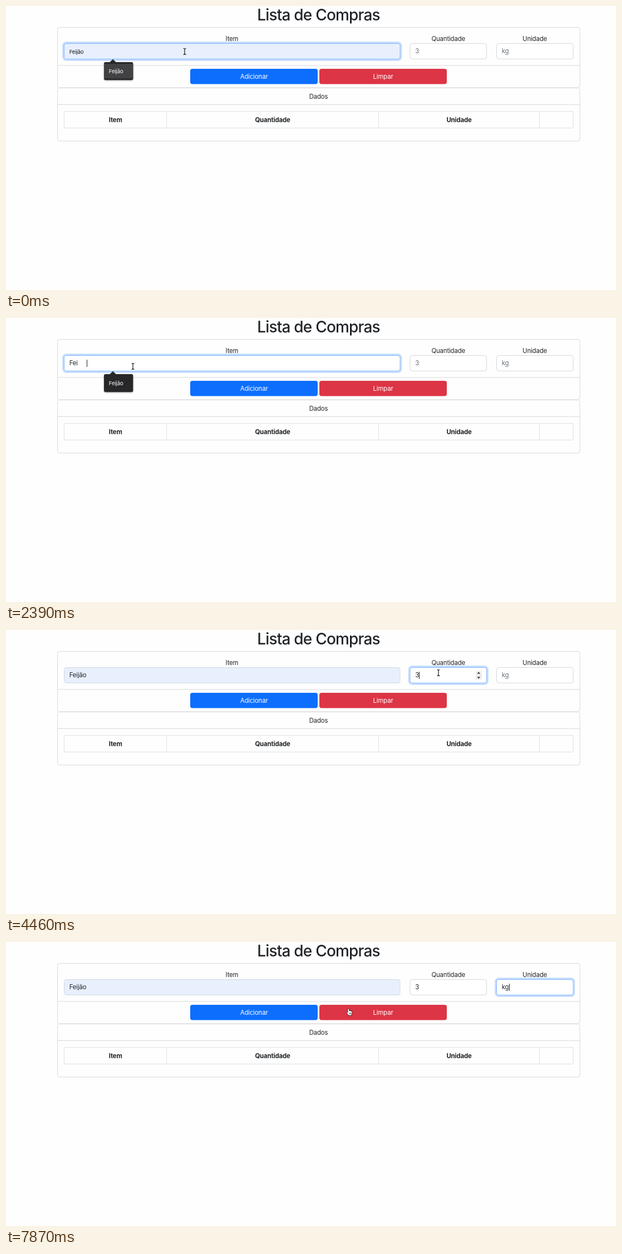
Animation, 1096 px wide and 511 px high, one loop 8 s. Source, as an HTML page with a canvas:

```html
<!DOCTYPE html>
<html lang="pt-BR">
<head>
<meta charset="utf-8">
<title>Lista de Compras</title>
<style>
  html, body { margin: 0; width: 100%; height: 100%; overflow: hidden; background: #fefefe; }
  canvas { display: block; }
</style>
</head>
<body>
<canvas id="stage" width="1096" height="511"></canvas>
<script>
const ctx = document.getElementById('stage').getContext('2d');
const LOOP = 8000;
const INK = '#212529', HINT = '#6c7278', LINE = '#d8d9da', FOCUS = '#86b7fe';

const fields = {
  item: { x: 104.5, w: 603.5, textX: 113.7 },
  qty: { x: 726, w: 137.5, textX: 735.2 },
  unit: { x: 881.5, w: 137.5, textX: 890.7 }
};

const start = {
  focus: 'item', item: 'Feijão', qty: '', unit: '', preview: true, filled: false,
  tip: 'item', caret: false, spin: false, cursor: 'beam', x: 321, y: 82
};

// Each entry changes part of the state from its time on.
const steps = [
  [1050, { cursor: 'none' }],
  [1340, { cursor: 'arrow', x: 704, y: 43 }],
  [1490, { cursor: 'beam', x: 767, y: 80, spin: true }],
  [1640, { x: 765, y: 83, focus: 'qty', item: 'Fei', preview: false, tip: '', caret: true }],
  [1940, { x: 690, y: 83 }],
  [2090, { x: 450, y: 84 }],
  [2240, { x: 290, y: 86 }],
  [2390, { x: 228, y: 87, focus: 'item', spin: false, tip: 'item' }],
  [2540, { cursor: 'arrow', x: 216, y: 108, preview: true, item: 'Feijão', caret: false }],
  [2680, { x: 215, y: 116 }],
  [2980, { preview: false, filled: true, tip: '', caret: true }],
  [3130, { x: 390, y: 108 }],
  [3280, { cursor: 'beam', x: 640, y: 88 }],
  [3430, { x: 765, y: 82, spin: true }],
  [3580, { focus: 'qty' }],
  [4020, { qty: '3' }],
  [4160, { x: 779, y: 77 }],
  [4460, { x: 777 }],
  [4610, { x: 826, y: 79 }],
  [4760, { x: 889, y: 82, spin: false }],
  [4900, { x: 925, y: 84 }],
  [5050, { x: 932, y: 85, focus: 'unit' }],
  [5200, { tip: 'unit' }],
  [5650, { caret: false }],
  [6090, { caret: true }],
  [6690, { caret: false }],
  [7140, { caret: true }],
  [7280, { unit: 'k' }],
  [7580, { unit: 'kg', tip: '' }],
  [7870, { cursor: 'hand', x: 617, y: 126 }]
];

function stateAt(t) {
  return Object.assign({}, start, ...steps.filter(s => s[0] <= t).map(s => s[1]));
}

function text(str, x, y, { size = 11.4, weight = 400, color = INK, align = 'left', gap = -0.15 } = {}) {
  ctx.font = `${weight} ${size}px Inter, Roboto, sans-serif`;
  ctx.letterSpacing = gap + 'px';
  ctx.textAlign = align;
  ctx.fillStyle = color;
  ctx.fillText(str, x, y);
}

function box(x, y, w, h, r, fill, stroke, width = 1) {
  ctx.beginPath();
  ctx.roundRect(x, y, w, h, r);
  if (fill) { ctx.fillStyle = fill; ctx.fill(); }
  if (stroke) { ctx.strokeStyle = stroke; ctx.lineWidth = width; ctx.stroke(); }
}

function shape(points, fill, stroke, width = 1) {
  ctx.beginPath();
  points.forEach(p => ctx.lineTo(...p));
  ctx.closePath();
  if (stroke) { ctx.strokeStyle = stroke; ctx.lineWidth = width; ctx.lineJoin = 'round'; ctx.stroke(); }
  ctx.fillStyle = fill;
  ctx.fill();
}

function rule(x1, y1, x2, y2, color = LINE) {
  ctx.beginPath();
  ctx.moveTo(x1, y1);
  ctx.lineTo(x2, y2);
  ctx.strokeStyle = color;
  ctx.lineWidth = 1;
  ctx.stroke();
}

function drawPage() {
  ctx.fillStyle = '#fefefe';
  ctx.fillRect(0, 0, 1096, 511);
  const mid = { align: 'center' };
  text('Lista de Compras', 561.5, 25.5, { size: 28, weight: 500, align: 'center', gap: -0.8 });

  box(92.5, 38.5, 938.5, 108.5, 4, null, LINE);
  box(92.5, 147.5, 938.5, 95.5, 4, null, LINE);
  rule(92.5, 107, 1031, 107);
  rule(92.5, 177.5, 1031, 177.5);

  text('Item', 406, 63, mid);
  text('Quantidade', 794.7, 63, mid);
  text('Unidade', 950, 63, mid);
  text('Dados', 561.5, 166.5, mid);

  box(331, 113, 229, 27.5, 4, '#0d6efd');
  box(563, 113, 229, 27.5, 4, '#dc3545');
  text('Adicionar', 445.7, 131, { align: 'center', color: '#fff' });
  text('Limpar', 677.5, 131, { align: 'center', color: '#fff' });

  const grid = '#dee0e3';
  box(104.5, 189.5, 914.5, 30, 0, null, grid);
  [288.5, 669.5, 958.5].forEach(x => rule(x, 189.5, x, 219.5, grid));
  const bold = { align: 'center', weight: 700 };
  text('Item', 196.7, 209, bold);
  text('Quantidade', 479, 209, bold);
  text('Unidade', 814, 209, bold);
}

function drawField(name, s) {
  const { x, w, textX } = fields[name];
  const focused = s.focus === name;
  const tinted = name === 'item' && (s.preview || s.filled);
  if (focused) box(x - 1.8, 65.7, w + 3.6, 31.6, 5.5, null, '#c2dbfe', 3);
  box(x, 67.5, w, 27.8, 4, tinted ? '#e8f0fe' : '#fff', focused ? FOCUS : '#d3d8dd');

  const value = s[name];
  if (name === 'item' && s.preview) {
    text(value, textX, 85.5, { size: 9.6, gap: -0.15, color: '#111' });
  } else if (value) {
    text(value, textX, 85.3);
  } else {
    text(name === 'qty' ? '3' : 'kg', textX, 85.3, { color: HINT });
  }
  if (focused && s.caret) {
    const end = value ? { item: 31.5, qty: 6.5, unit: value.length * 6.4 }[name] : 0;
    ctx.fillStyle = '#222';
    ctx.fillRect(Math.round(textX + end), 75, 1, 13);
  }
}

function drawSpinner() {
  box(844, 73.5, 11, 16, 1, '#efefef');
  shape([[846.3, 78.8], [849.3, 75.3], [852.3, 78.8]], '#444');
  shape([[846.3, 84.2], [849.3, 87.7], [852.3, 84.2]], '#444');
}

function drawTip(s) {
  const unit = s.tip === 'unit';
  const [x, w, tipX] = unit ? [934, 35, 950] : [176, 52.3, 192];
  ctx.save();
  ctx.shadowColor = 'rgba(0,0,0,.35)';
  ctx.shadowBlur = 3;
  ctx.shadowOffsetY = 1;
  box(x, 101, w, 32.3, 3, '#27272a');
  ctx.restore();
  shape([[tipX - 6.5, 102], [tipX, 95.8], [tipX + 6.5, 102]], '#27272a');
  if (!unit && s.preview) box(x, 104, w, 26.5, 0, '#424244');
  text(unit ? 'kg' : 'Feijão', x + 8.8, 121.2, { size: 9.6, color: '#fff' });
}

function beam(x, y) {
  const path = () => {
    ctx.beginPath();
    ctx.moveTo(x - 2.5, y - 5.5);
    ctx.quadraticCurveTo(x, y - 5.5, x, y - 3.8);
    ctx.lineTo(x, y + 3.8);
    ctx.quadraticCurveTo(x, y + 5.5, x - 2.5, y + 5.5);
    ctx.moveTo(x + 2.5, y - 5.5);
    ctx.quadraticCurveTo(x, y - 5.5, x, y - 3.8);
    ctx.moveTo(x, y + 3.8);
    ctx.quadraticCurveTo(x, y + 5.5, x + 2.5, y + 5.5);
    ctx.stroke();
  };
  ctx.strokeStyle = '#111';
  ctx.lineWidth = 1.15;
  path();
}

function arrow(x, y) {
  const at = [[0, 0], [0, 10], [2.3, 8], [4, 12], [5.8, 11.2], [4.1, 7.4], [7, 7.2]];
  shape(at.map(([a, b]) => [x + a, y + b]), '#111', '#fff', 1.6);
}

function hand(x, y) {
  ctx.save();
  ctx.translate(x, y);
  ctx.beginPath();
  ctx.moveTo(-2.3, 1);
  ctx.lineTo(-2.9, -4.6);
  ctx.quadraticCurveTo(-2, -6.6, -1, -4.8);
  ctx.lineTo(-0.4, -1.8);
  ctx.quadraticCurveTo(0.8, -2.9, 1.6, -1.5);
  ctx.quadraticCurveTo(2.7, -2.3, 3.3, -0.9);
  ctx.quadraticCurveTo(4.7, -1.4, 4.7, 0.6);
  ctx.quadraticCurveTo(4.6, 3.6, 3.3, 5.8);
  ctx.lineTo(-1.4, 5.8);
  ctx.quadraticCurveTo(-2.5, 3.7, -4.5, 1.4);
  ctx.quadraticCurveTo(-4.5, -0.6, -2.3, 1);
  ctx.closePath();
  ctx.lineJoin = 'round';
  ctx.strokeStyle = '#111';
  ctx.lineWidth = 1.4;
  ctx.stroke();
  ctx.fillStyle = '#fff';
  ctx.fill();
  ctx.lineWidth = 0.6;
  [-0.1, 1.5, 3].forEach(fx => rule(fx, 1.2, fx, 3.8, '#555'));
  ctx.restore();
}

const cursors = { beam, arrow, hand, none() {} };

function draw() {
  const s = stateAt(performance.now() % LOOP);
  drawPage();
  Object.keys(fields).forEach(name => drawField(name, s));
  if (s.spin) drawSpinner();
  if (s.tip) drawTip(s);
  cursors[s.cursor](s.x, s.y);
  requestAnimationFrame(draw);
}
draw();
</script>
</body>
</html>
```
